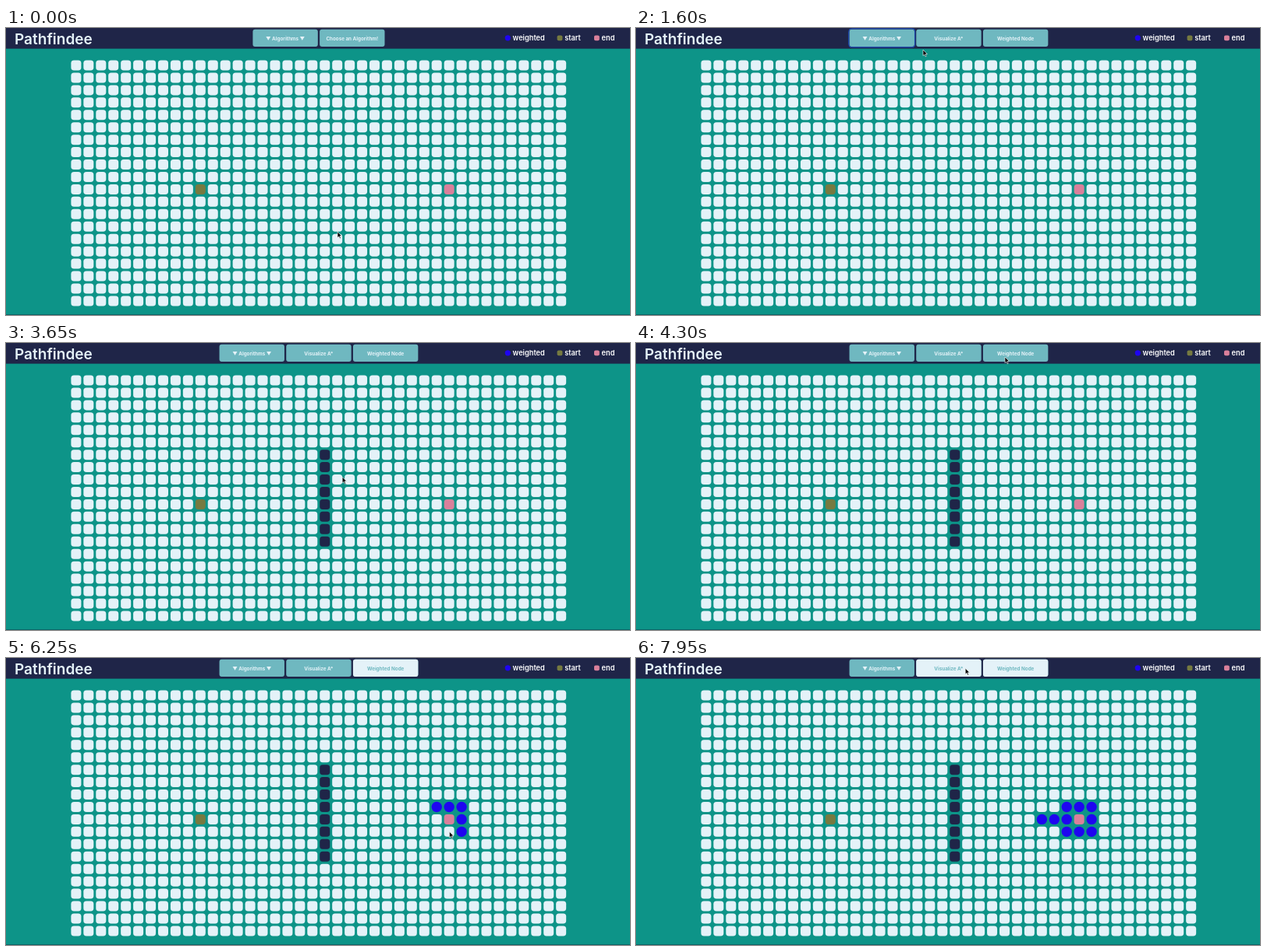
These frames come from a looping animation (800 by 369 pixels, 8000 ms). An HTML page:

```html
<!DOCTYPE html>
<html lang="en">
<head>
<meta charset="utf-8">
<title>Pathfindee</title>
<style>
  html, body { margin: 0; width: 100%; height: 100%; overflow: hidden; background: #0d9488; }
  svg { display: block; width: 800px; height: 369px; font-family: Inter, "Open Sans", sans-serif; }
  .title { font-size: 19px; font-weight: 600; fill: #e4f2f8; }
  .legend { font-size: 9.2px; font-weight: 600; fill: #fff; }
  .label { font-size: 6.3px; font-weight: 700; text-anchor: middle; font-feature-settings: "calt" 0; }
</style>
</head>
<body>
<svg id="stage" viewBox="0 0 800 369"></svg>
<script>
const LOOP = 8000, STEP = 50, PITCH = 15.942;
const NAVY = "#1f2548", PALE = "#e4f2f8", TEAL = "#6fb8c0";
const BLUE = "#1e05f0", OLIVE = "#767a40", PINK = "#d9809b";
const stage = document.getElementById("stage");

function add(tag, attrs, text, parent = stage) {
  const node = document.createElementNS("http://www.w3.org/2000/svg", tag);
  for (const key in attrs) node.setAttribute(key, attrs[key]);
  if (text) node.textContent = text;
  return parent.appendChild(node);
}
const box = (x, y, width, height, rx, fill, parent) =>
  add("rect", { x, y, width, height, rx, fill }, "", parent);
const square = (x, y, size, fill) =>
  box(x - size / 2, y - size / 2, size, size, size * .29, fill);
const dot = (cx, cy, r) => add("circle", { cx, cy, r, fill: BLUE });
const show = (node, on) => node.setAttribute("visibility", on ? "visible" : "hidden");
const clamp = v => Math.max(0, Math.min(1, v));
const smooth = u => u * u * (3 - 2 * u);

// Page frame and legend
box(0, 0, 800, 369, 0, "#0d9488");
box(0, 368, 800, 1, 0, "#0b6668");
box(0, 0, 800, 26.6, 0, NAVY);
add("text", { x: 11, y: 20.9, class: "title" }, "Pathfindee");
const legend = (x, word) => add("text", { x, y: 16.4, class: "legend" }, word);
dot(643.3, 12.8, 3.6);
square(710, 12.8, 6.8, OLIVE);
square(757.4, 12.8, 6.8, PINK);
legend(649.6, "weighted");
legend(716.2, "start");
legend(763.6, "end");

// Grid
const colX = c => 89.9 + c * PITCH;
const rowY = r => 48 + r * PITCH;
const cells = Array.from({ length: 20 }, (_, r) =>
  Array.from({ length: 40 }, (_, c) => square(colX(c), rowY(r), 13, PALE)));
cells[10][10].setAttribute("fill", OLIVE);
cells[10][30].setAttribute("fill", PINK);

// A stroke walks the grid by compass letters, marking a cell at every pause.
function stroke(col, row, moves, start, pause) {
  const spots = [];
  for (const move of "." + moves) {
    col += (move === "E") - (move === "W");
    row += (move === "S") - (move === "N");
    spots.push({ t: start + spots.length * pause, x: colX(col), y: rowY(row), cell: cells[row][col] });
  }
  return spots;
}
const walls = stroke(20, 6, "SSSSSSS", 2450, 110);
const weights = stroke(29, 9, "EESSWWNWW", 5350, 183);
weights.forEach(spot => spot.dot = dot(spot.x, spot.y, 6.7));

// Buttons, centred as a row
function buttonRow(labels) {
  const group = add("g", {});
  const buttons = labels.map((label, i) => {
    const x = 402.1 + (i - labels.length / 2) * 85.7;
    const plate = (fill, ink) => {
      const layer = add("g", {}, "", group);
      box(x, 1.7, 83.4, 22.3, 3, fill, layer);
      add("text", { x: x + 41.7, y: 15.7, class: "label" }, label, layer);
      layer.lastChild.setAttribute("fill", ink);
      return layer;
    };
    plate(TEAL, PALE);
    return { x, lit: plate(PALE, TEAL) };
  });
  buttons.forEach(b => b.lit.setAttribute("opacity", 0));
  const ring = box(buttons[0].x - .8, .9, 85, 23.9, 3.6, "none", group);
  ring.setAttribute("stroke", "#1c52cc");
  return { group, buttons, ring };
}
const before = buttonRow(["▼ Algorithms ▼", "Choose an Algorithm!"]);
const after = buttonRow(["▼ Algorithms ▼", "Visualize A*", "Weighted Node"]);
const light = (button, t, start) => button.lit.setAttribute("opacity", clamp((t - start) / 200));

// Pointer
const stop = (t, x, y) => ({ t, x, y });
const stops = [
  stop(0, 425, 262), stop(200, 425, 262), stop(850, 355, 17), stop(1350, 357, 20), stop(1600, 368, 28),
  ...walls,
  stop(4300, 473, 18), stop(4700, 477, 16),
  ...weights,
  stop(7150, 520, 206), stop(7750, 424, 16), stop(LOOP, 422, 13)
];
const pointer = add("path", {
  d: "M0 0V7.6L1.8 6L3 8.8L4.3 8.2L3.1 5.5H5.5Z",
  fill: "#000", stroke: "#fff", "stroke-width": .6
});
function pointerAt(t) {
  const i = stops.findIndex(s => s.t > t), a = stops[i - 1], b = stops[i];
  const k = smooth((t - a.t) / (b.t - a.t));
  return [a.x + (b.x - a.x) * k, a.y + (b.y - a.y) * k];
}

function draw(t) {
  const chosen = t >= 1350, focused = t >= 900 && t < walls[0].t;
  show(before.group, !chosen);
  show(after.group, chosen);
  show(before.ring, focused && !chosen);
  show(after.ring, focused && chosen);
  light(after.buttons[1], t, 7700);
  light(after.buttons[2], t, 4300);
  walls.forEach(s => s.cell.setAttribute("fill", t >= s.t ? NAVY : PALE));
  weights.forEach(s => {
    show(s.dot, t >= s.t);
    show(s.cell, t < s.t);
  });
  pointer.setAttribute("transform", `translate(${pointerAt(t)})`);
}

const started = performance.now();
function tick() {
  const t = (performance.now() - started) % LOOP;
  draw(Math.floor(t / STEP) * STEP);
  requestAnimationFrame(tick);
}
tick();
</script>
</body>
</html>
```
